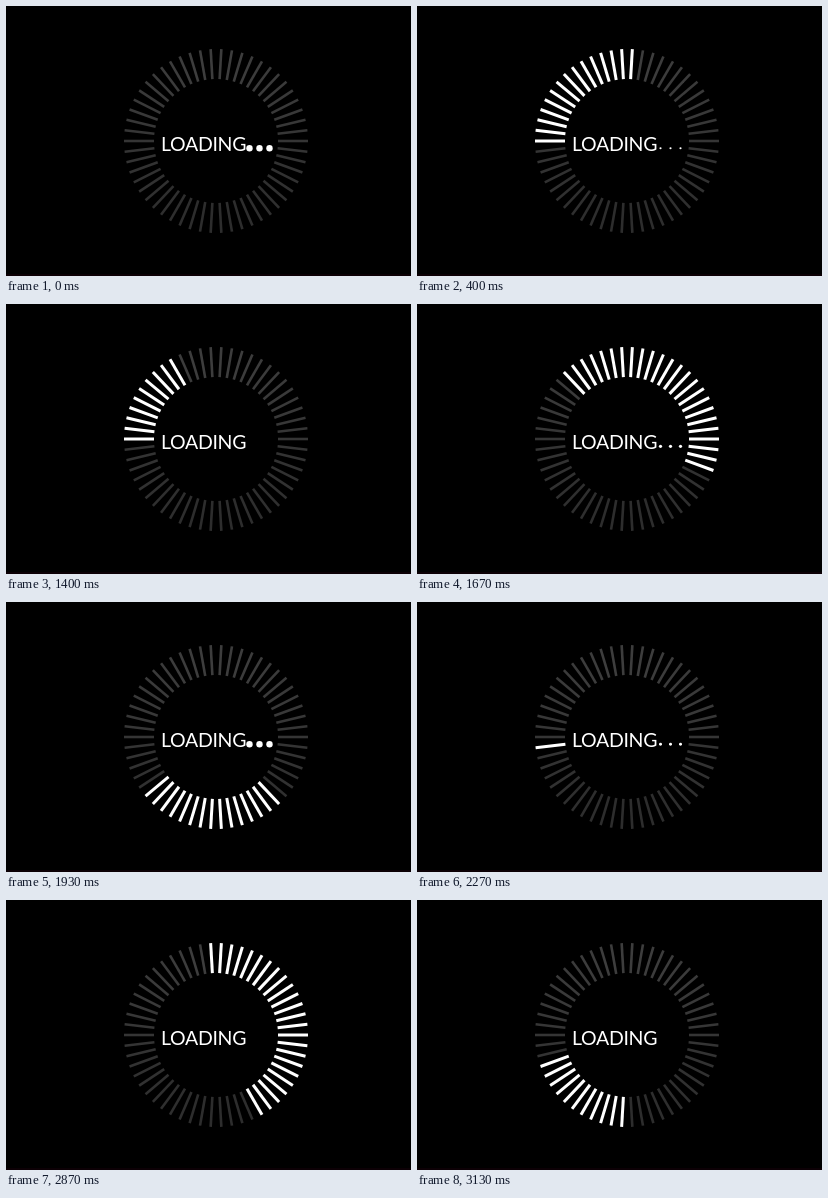
These frames come from a looping animation (405x270 px, 3190 ms). An HTML page:

```html
<!DOCTYPE html>
<html lang="en">
<head>
<meta charset="utf-8">
<title>Loading</title>
<style>
  html, body { margin: 0; width: 100%; height: 100%; overflow: hidden; background: #000; }
  svg { display: block; width: 100%; height: 100%; }
  text { font: 19.5px Lato, "Open Sans", sans-serif; letter-spacing: -0.3px; fill: #fff; }
</style>
</head>
<body>
<svg viewBox="0 0 405 270">
  <rect y="268" width="405" height="2" fill="#0c0005"/>
  <g id="ring" transform="translate(210 135)"></g>
  <text x="155" y="145.3">LOADING</text>
  <g id="dots" fill="#fff"></g>
</svg>
<script>
const LOOP = 3190, STEP = 200 / 3, TICKS = 54, SWEEP = 16;
const NS = "http://www.w3.org/2000/svg";

function add(parent, tag, attrs) {
  const el = document.createElementNS(NS, tag);
  for (const name in attrs) el.setAttribute(name, attrs[name]);
  return document.getElementById(parent).appendChild(el);
}

// Tick 0 points left; the rest follow clockwise.
const ticks = Array.from({ length: TICKS }, (_, k) => {
  const turn = k * 360 / TICKS;
  const grey = Math.round(53 + 8 * Math.sin(turn * Math.PI / 180));
  const el = add("ring", "line", { x1: -62, x2: -92, transform: `rotate(${turn})` });
  return { el, dim: `rgb(${grey},${grey},${grey})` };
});
const dots = [243.5, 253.5, 263.5].map(cx => add("dots", "circle", { cx, cy: 142.3 }));

const clamp = x => Math.min(1, Math.max(0, x));
const ease = x => (1 - Math.cos(Math.PI * clamp(x))) / 2;
const head = p => Math.round(TICKS * ease((p - 0.6) / 15.5));
const tail = p => Math.floor(TICKS * ease((p - 6.4) / 11.4) + 0.4);

// Dots shrink away, stay hidden, then grow back.
function dotRadius(step) {
  const q = step % 29;
  return 3.2 * Math.max(clamp((8.5 - q) / 7.5), clamp((q - 22) / 6));
}

function draw(time) {
  const step = Math.floor((time % LOOP + 5) / STEP);
  const pos = step > 29 ? step - 0.84 : step; // the sweep hesitates once
  const arcs = [0, 1, 2].map(c => {
    const p = pos - c * SWEEP;
    return [tail(p), head(p)];
  });
  ticks.forEach(({ el, dim }, k) => {
    const lit = arcs.some(([from, to]) => k >= from && k < to);
    el.setAttribute("stroke", lit ? "#fff" : dim);
    el.setAttribute("stroke-width", lit ? 3 : 2.6);
  });
  const r = dotRadius(step);
  dots.forEach(dot => dot.setAttribute("r", r));
}

const start = performance.now();
function loop() {
  draw(performance.now() - start);
  requestAnimationFrame(loop);
}
loop();
</script>
</body>
</html>
```
